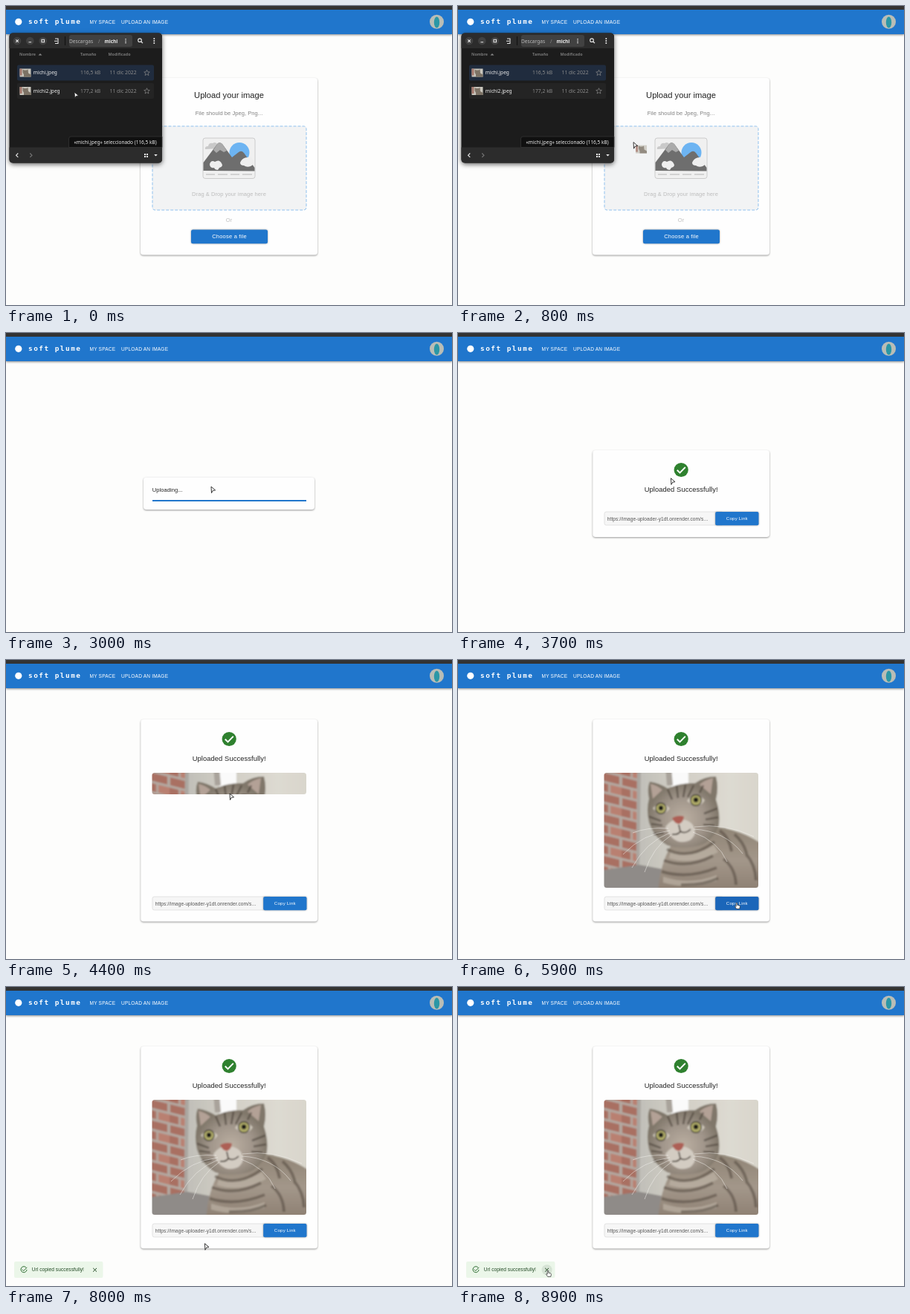
Write an HTML page that moves like this. It is 600 by 403 pixels and loops after 9000 ms.

```html
<!DOCTYPE html>
<html lang="en">
<head>
<meta charset="utf-8">
<title>Image upload</title>
<style>
html, body { margin: 0; width: 100%; height: 100%; overflow: hidden; background: #fdfdfc; }
svg { display: block; width: 600px; height: 403px; font: 7.5px "Liberation Sans", Arial, sans-serif; letter-spacing: .009em; }
.mid { text-anchor: middle; }
.h5 { font-size: 11.2px; letter-spacing: 0; }
.h6 { font-size: 9.4px; letter-spacing: .0075em; }
.small { font-size: 6.55px; }
.btn { letter-spacing: .0286em; fill: #fff; }
.card { fill: #fefefe; filter: drop-shadow(0 1px 1.2px #0006); }
.raise { filter: drop-shadow(0 .8px .8px #0006); }
.bar { filter: drop-shadow(0 1px 1.5px #0007); }
.files { font: 6.8px "Noto Sans", "Open Sans", sans-serif; letter-spacing: 0; fill: #eee; }
.files .dim { fill: #8b8b8b; }
.files .head { font-size: 5.4px; font-weight: 700; fill: #777; }
.line { fill: none; stroke: #e8e8e8; stroke-width: 1.1; }
</style>
</head>
<body>
<svg viewBox="0 0 600 403">
  <defs>
    <pattern id="bricks" width="30" height="28" patternUnits="userSpaceOnUse" patternTransform="translate(190 149) skewY(14)">
      <path fill="#b3a8a0" d="M0 0h30v28H0z"/>
      <path fill="#a96f62" d="M1 1.500h26v10.500H1zM0 15.500h12v10.500H0z"/>
      <path fill="#b98071" d="M15 15.500h15v10.500H15z"/>
    </pattern>
    <linearGradient id="wall"><stop offset=".2" stop-color="#bdbcb6"/><stop offset=".45" stop-color="#cfccc3"/><stop offset=".8" stop-color="#dddad1"/><stop offset="1" stop-color="#d8d5cb"/></linearGradient>
    <linearGradient id="coat" x2="0" y2="1"><stop stop-color="#8f8475"/><stop offset=".5" stop-color="#a3978a"/><stop offset="1" stop-color="#8b7d70"/></linearGradient>
    <radialGradient id="face" cy=".6"><stop stop-color="#bcb0a2"/><stop offset=".6" stop-color="#a0958a"/><stop offset="1" stop-color="#80776a"/></radialGradient>
    <clipPath id="photoClip"><rect id="reveal" x="196.500" y="152" width="207.500" height="155" rx="3.500"/></clipPath>
    <filter id="soft" x="-5%" y="-5%" width="110%" height="110%"><feGaussianBlur stdDeviation="1"/></filter>
    <g id="thumb">
      <path fill="#c9c6bd" d="M0 0h15v11H0z"/>
      <path fill="#a5786c" d="M0 0h3v9H0z"/>
      <path fill="#7c7265" d="M4 1l2 1h3l2-1 .5 5L15 8v3H5.500V8L4 5z"/>
    </g>
    <path id="star" d="M0-3.800L1.100-1.200 3.800-1 1.700.8 2.400 3.500 0 2-2.400 3.500-1.700.8-3.800-1-1.100-1.200z"/>
  </defs>

  <path fill="#fdfdfc" d="M0 0h600v403H0z"/>
  <g>
    <path class="bar" fill="#2076cc" d="M0 4h600v34H0z"/>
    <path fill="#333" d="M0 0h600v5H0z"/>
    <circle cx="16.800" cy="21.300" r="4.600" fill="#fff"/>
    <text x="30" y="24.400" xml:space="preserve" fill="#fff" style="font:700 9.4px 'DejaVu Sans Mono',monospace;letter-spacing:1.5px">soft plume</text>
    <text class="btn small" x="112.500" y="23.700">MY SPACE</text>
    <text class="btn small" x="155" y="23.700">UPLOAD AN IMAGE</text>
    <circle cx="579.500" cy="21.300" r="9.500" fill="#b9bdb6"/>
    <ellipse cx="579.500" cy="22" rx="3.700" ry="7.500" fill="#2a97a6"/>
  </g>

  <rect id="card" class="card" rx="3.800"/>

  <g id="choose">
    <text class="mid h5" x="300" y="124" fill="#222">Upload your image</text>
    <text class="mid" x="300" y="147" fill="#828282">File should be Jpeg, Png...</text>
    <rect x="197" y="162" width="207" height="113" rx="3.500" fill="#f2f3f4" stroke="#8fc0ee" stroke-dasharray="4 2"/>
    <rect x="265" y="178" width="70" height="54.500" rx="3" fill="#f0f0f0" stroke="#c2c2c2" stroke-width=".8"/>
    <circle cx="314" cy="197.500" r="13.500" fill="#6db4f2"/>
    <path fill="#c9c9c9" d="M268 193q-1-4 4-4 1-5 6-4 4-3 7 2 4 0 3 5z"/>
    <path fill="#6e6e6e" d="M265.500 222V211L285 185q3-2 6 1l13 18 9-7q4-3 7 1l14.500 20v4.500z"/>
    <path fill="#aaa" d="M285 185q3-2 6 1l6 9-4 2-5-3-5 4-4-4z"/>
    <path fill="#eee" d="M274 213q2-6 7-3 6-4 9 2 3 4-3 6l-2 3q-4 0-5-3-6 1-6-5zM315 211q3-7 10-7 6-1 8 5 1 5-4 7-5 2-9-1-5 0-5-4z"/>
    <path fill="none" stroke="#b5b5b5" d="M269 227h12m4 0h13m4 0h12m4 0h13"/>
    <text class="mid" x="300" y="256" fill="#bdbdbd">Drag &amp; Drop your image here</text>
    <text class="mid" x="300" y="290.500" fill="#bdbdbd">Or</text>
    <rect class="raise" x="249" y="301.500" width="103" height="18.700" rx="2.500" fill="#2076cc"/>
    <text class="mid btn" x="300.500" y="313.300">Choose a file</text>
  </g>

  <g id="files" class="files">
    <rect x="4.500" y="36.500" width="205.500" height="175" rx="5" fill="#1c1c1c" style="filter:drop-shadow(0 2px 3px #0009)"/>
    <path fill="#2c2c2c" d="M4.500 57V41.500q0-5 5-5H205q5 0 5 5V57zM4.500 190.500H210v16q0 5-5 5H9.500q-5 0-5-5z"/>
    <g fill="#414141"><circle cx="15" cy="47" r="5.300"/><circle cx="32.300" cy="47" r="5.300"/><circle cx="49.700" cy="47" r="5.300"/><rect x="85" y="39" width="85" height="16" rx="3"/></g>
    <path class="line" d="M13.300 45.300l3.500 3.500m0-3.500l-3.500 3.500M30.500 48.700h3.600M48 45.300h3.500v3.500H48zM66 44h4v6.500h-4m-1-3.300h4"/>
    <path stroke="#111" d="M79.500 41v12"/>
    <text class="dim" x="85" y="49.500" font-size="6.600" style="fill:#bbb">Descargas</text>
    <text class="dim" x="124" y="49.500">/</text>
    <text x="132.500" y="49.500" font-size="6.400" font-weight="700">michi</text>
    <g fill="#eee"><circle cx="161" cy="44.800" r=".8"/><circle cx="161" cy="47.200" r=".8"/><circle cx="161" cy="49.600" r=".8"/><circle cx="199.300" cy="44" r="1"/><circle cx="199.300" cy="47" r="1"/><circle cx="199.300" cy="50" r="1"/></g>
    <circle class="line" cx="180" cy="46.200" r="2.300"/><path class="line" d="M181.800 48l2.200 2.200"/>
    <text class="head" x="18" y="67">Nombre</text><path fill="#888" d="M43.500 66.500l2.500-2.500 2.500 2.500z"/>
    <text class="head" x="100" y="67">Tamaño</text>
    <text class="head" x="137.500" y="67">Modificado</text>
    <rect x="15" y="79.500" width="184" height="21" rx="2" fill="#202c3e"/>
    <rect x="15" y="104" width="184" height="21" rx="2" fill="#242424"/>
    <use href="#thumb" x="18.500" y="84.500"/><use href="#thumb" x="18.500" y="109"/>
    <text x="36.800" y="92.300" font-size="6.600">michi.jpeg</text>
    <text x="36.800" y="116.700" font-size="6.600">michi2.jpeg</text>
    <g class="dim">
      <text x="100" y="92.300">116,5 kB</text><text x="139.500" y="92.300">11 dic 2022</text>
      <text x="100" y="116.700">177,2 kB</text><text x="139.500" y="116.700">11 dic 2022</text>
    </g>
    <g fill="none" stroke="#8b8b8b" stroke-width=".7"><use href="#star" x="189.500" y="90"/><use href="#star" x="189.500" y="114.500"/></g>
    <path fill="#101010" stroke="#383838" stroke-width=".7" d="M84.500 190.500V179q0-3 3-3H210v14.500z"/>
    <text x="91.500" y="185.700" font-size="6.500">«michi.jpeg» seleccionado (116,5 kB)</text>
    <path class="line" d="M16.300 198.500l-2.700 2.700 2.700 2.700"/>
    <path class="line" style="stroke:#777" d="M32.300 198.500l2.700 2.700-2.700 2.700"/>
    <path fill="#eee" d="M186 199h2v2h-2zm3 0h2v2h-2zm-3 3h2v2h-2zm3 0h2v2h-2zM199.200 200h4.600l-2.300 2.600z"/>
  </g>
  <use id="drag" href="#thumb" opacity=".8"/>

  <g id="upload">
    <text x="196.800" y="214.300" fill="#222">Uploading...</text>
    <path id="dots" fill="none" stroke="#4fa3ea" stroke-width="1.700" stroke-dasharray="1.600 .8" d="M197 226h207"/>
    <rect id="bar" x="197" y="225" height="2" fill="#2076cc"/>
  </g>

  <g id="done">
    <g id="top">
      <circle cx="300.200" cy="106.500" r="9.600" fill="#2f812f"/>
      <path fill="none" stroke="#fff" stroke-width="2" d="M294.800 106.700l3.700 3.700 7.300-7.500"/>
      <text class="mid h6" x="300.200" y="136" fill="#222">Uploaded Successfully!</text>
    </g>
    <g id="photo" clip-path="url(#photoClip)">
      <g filter="url(#soft)">
        <path fill="url(#wall)" d="M190 145h220v170H190z"/>
        <path fill="#fafafa" d="M287 145h23v30h-23z"/>
        <path fill="#a9a39b" d="M279 145h8l2 24h-8z"/>
        <path fill="url(#bricks)" d="M190 145h51l-1 140-50 8z"/>
        <path fill="#aaa6a0" d="M241 145h5l-2 135h-4z"/>
        <path fill="#8f8b88" d="M190 284l54-8 32 6v33H190z"/>
        <path fill="url(#coat)" d="M269 315q2-38 17-64l62-26q36 5 62 24v66z"/>
        <path fill="#c4b9ac" opacity=".6" d="M286 257q26 12 58-8l6 10q-34 18-66 8zM276 292q36 12 72-2v8q-36 12-72 2z"/>
        <path fill="none" stroke="#4d4339" stroke-width="4" opacity=".5" d="M281 255q30 16 64-10M277 270q32 12 66-6M274 285q35 11 74-5M300 303q30 1 50-9M352 230q13 9 16 28M372 235q14 12 17 30M357 268q16 12 17 35M388 262q12 14 13 35"/>
        <path fill="url(#face)" d="M257 219q-4-18 0-32-3-14 1-23 13 2 24 9 18-8 37-7 12-9 28-9 4 15 0 31 6 18 4 34-5 18-23 27-25 7-46 1-18-10-25-31z"/>
        <path fill="#b3a196" d="M259 167q9 2 16 8l-13 12zM343 159q-12 3-18 9l15 13z"/>
        <path fill="#d3ccc2" d="M279 225q8-11 17-9 11-3 19 5 9 13-3 22-22 9-33-18z"/>
        <path fill="none" stroke="#453d34" stroke-width="2.600" opacity=".6" d="M282 174l6 14M294 169l2 17M306 168l-3 17M317 169l-8 16M330 169l-5 10M257 211l16 6M260 221l15 2M349 200l-18 7M350 212l-17 3M345 223l-15-1M263 235l14-2"/>
        <path fill="#cfc8bb" d="M262 200q11-13 23 0-9 13-23 0zM308 190q11-15 24-1-8 14-24 1z"/>
        <g fill="#b3af6a" stroke="#34302a" stroke-width="1.400"><circle cx="273" cy="200" r="7"/><circle cx="320" cy="189" r="7.300"/></g>
        <g fill="#171615"><circle cx="273" cy="199.500" r="3.200"/><circle cx="320" cy="188.500" r="3.300"/></g>
        <path fill="#ad5f55" d="M288 213q8-5 16-2-1 8-7 10-6-1-9-8z"/>
        <path fill="none" stroke="#3e352d" stroke-width="1.600" d="M297 222l2 9m-11 4q8 1 11-4 7 4 14-3"/>
      </g>
      <path fill="none" stroke="#f4f2ed" stroke-width=".6" opacity=".85" d="M285 230q-36 4-63 32M285 233q-32 12-51 47M287 236q-25 16-36 50M283 227q-28-2-48 6M317 228q42 2 66 33M318 225q40-6 80 13M316 232q34 12 46 40"/>
    </g>
    <g id="foot">
      <rect x="197" y="319" width="160" height="18" rx="2.500" fill="#f6f6f6" stroke="#d9d9d9" stroke-width=".7"/>
      <text class="small" x="200.800" y="330.700" fill="#555">https://image-uploader-y1dt.onrender.com/s…</text>
      <rect id="copy" class="raise" x="346.200" y="319" width="58.300" height="18.300" rx="2"/>
      <text class="mid btn" x="375.300" y="330" font-size="6.150">Copy Link</text>
    </g>
    <g id="stack">
      <path fill="#e8dfcf" d="M381 306h14v14h-14z"/>
      <path fill="#e0664b" d="M382 306h13v2.500h-13zM382 310h13v2.500h-13z"/>
      <path fill="#5f9a80" d="M381 313.500h13v2h-13z"/>
      <path fill="#a58a58" d="M381 317h14v2.800h-14z"/>
    </g>
  </g>

  <g id="toast">
    <rect x="11" y="370" width="119.500" height="22" rx="2" fill="#ebf6e9"/>
    <path fill="none" stroke="#2f6d33" d="M27.200 378.300a4 4 0 1 0 .8 2.700M21.800 380.700l1.900 1.900 4.600-4.700"/>
    <text class="small" x="34.800" y="383.300" fill="#1e4620" style="letter-spacing:.0107em">Url copied successfully!</text>
    <circle id="halo" cx="119.600" cy="381.300" r="7" fill="#d6e3d5"/>
    <path stroke="#1e4620" d="M117.200 378.900l4.800 4.800m0-4.800l-4.800 4.800"/>
  </g>

  <path id="arrow" fill="#fff" stroke="#222" stroke-width=".9" stroke-linejoin="round" d="M0 0l5.600 4.900-3.300.5-1.800 3.200z"/>
  <path id="hand" fill="#fff" stroke="#222" stroke-width=".7" stroke-linejoin="round" d="M-.8.700q.8-1.200 1.600 0v2.600l2.700.6q1 .4.900 1.500l-.6 3H-.3l-2.200-3.200q.2-1.200 1.700 0z"/>
</svg>
<script>
const LOOP = 9000;
const $ = id => document.getElementById(id);
const show = (id, on) => $(id).style.display = on ? "" : "none";
const set = (id, attrs) => { for (const k in attrs) $(id).setAttribute(k, attrs[k]); };
const move = (id, x, y) => set(id, { transform: `translate(${x} ${y})` });
const ramp = (t, a, b) => Math.min(1, Math.max(0, (t - a) / (b - a)));
const ease = k => k * k * (3 - 2 * k);

// time, x, y of the pointer's tip
const path = [
  [100, 92, 116], [300, 38, 89], [1000, 285, 207], [1700, 285, 207], [2600, 276, 207],
  [3300, 276, 207], [4200, 301, 180], [5000, 301, 180], [5900, 375, 327],
  [7600, 375, 327], [8500, 117, 372], [8800, 121, 382]
];

function pointer(t) {
  let i = path.findIndex(p => p[0] > t);
  if (i < 0) return path[path.length - 1].slice(1);
  i = Math.max(i, 1);
  const [a, b] = [path[i - 1], path[i]], k = ease(ramp(t, a[0], b[0]));
  return [a[1] + (b[1] - a[1]) * k, a[2] + (b[2] - a[2]) * k];
}

function draw(t) {
  const choosing = t < 1300, uploading = !choosing && t < 3500, done = t >= 3500;
  const sized = t >= 4400;
  const [x, y] = pointer(t);

  const [cx, cy, w, h] = choosing ? [181, 97, 238, 238.5]
    : uploading ? [185, 194.5, 230, 43.500]
    : sized ? [181.3, 80, 237.7, 272.500] : [181.3, 158, 237.7, 117];
  set("card", { x: cx, y: cy, width: w, height: h });

  show("choose", choosing);
  show("files", choosing);
  show("drag", t >= 400 && t < 1000);
  move("drag", x + 3, y + 4);

  show("upload", uploading);
  set("bar", { width: 207 * ramp(t, 1600, 2600) });
  set("dots", { "stroke-dashoffset": t / 100 % 2.4 });

  show("done", done);
  move("top", 0, sized ? 0 : 78);
  move("foot", 0, sized ? 0 : -78);
  show("photo", sized);
  set("reveal", { height: 29 + 126 * ramp(t, 4900, 5500) });
  show("stack", t >= 6700 && t < 7600);

  const overCopy = t >= 5600 && x > 346 && y > 318;
  const overClose = t >= 8600;
  set("copy", { fill: overCopy ? "#1b66b9" : "#2076cc" });

  const grow = ease(ramp(t, 6600, 6900));
  show("toast", grow > 0);
  set("toast", { opacity: grow, transform: `translate(70.700 381) scale(${.75 + .25 * grow}) translate(-70.700 -381)` });
  show("halo", overClose);

  const hand = overCopy || overClose;
  show("hand", hand);
  show("arrow", !hand);
  move(hand ? "hand" : "arrow", x, y);
}

const start = performance.now();
function frame() {
  const t = (performance.now() - start) % LOOP;
  draw(Math.floor(t / 100) * 100);
  requestAnimationFrame(frame);
}
frame();
</script>
</body>
</html>
```
